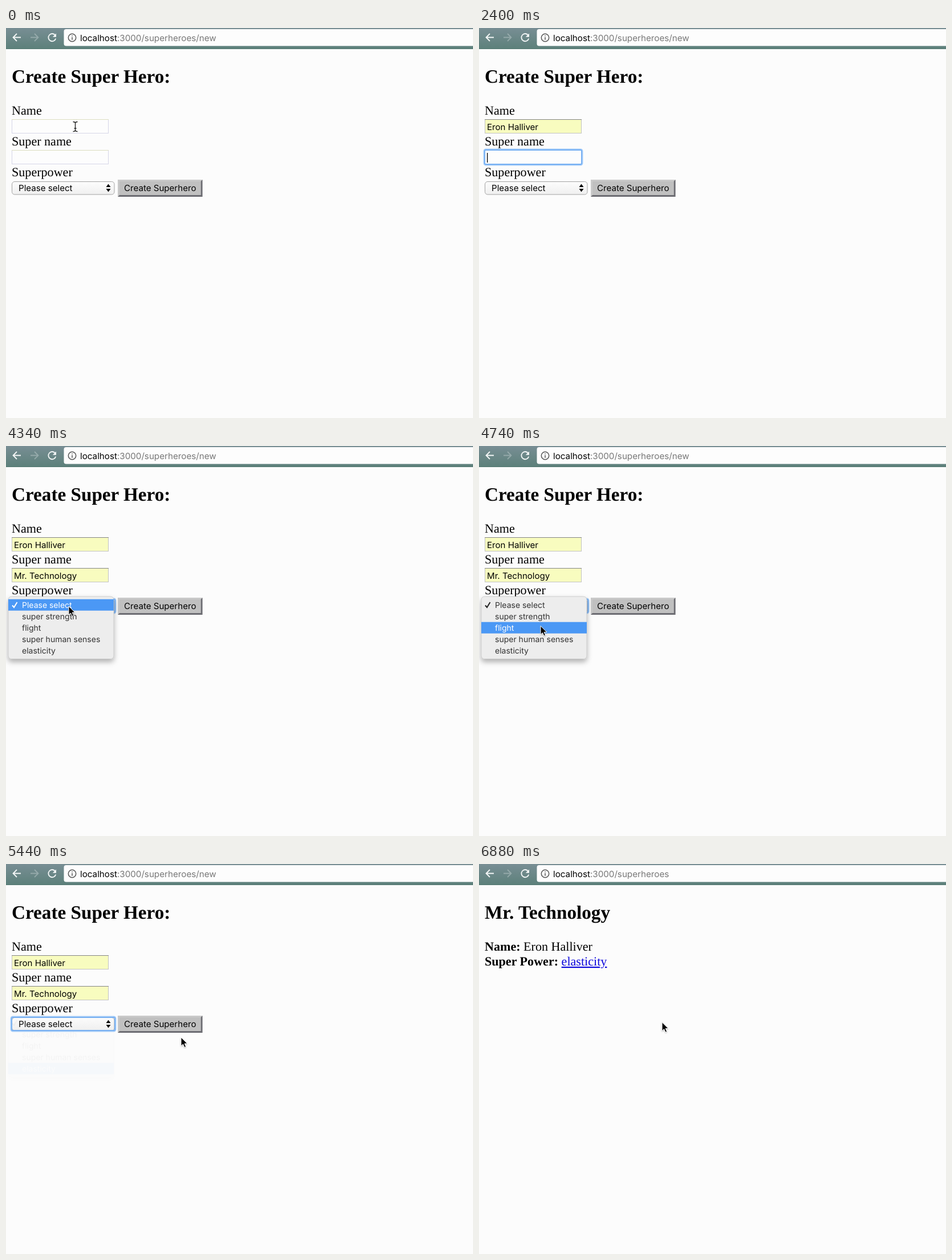
Write an HTML page that moves like this. It is 819 by 684 pixels and loops after 6900 ms.

```html
<!DOCTYPE html>
<html lang="en">
<head>
<meta charset="utf-8">
<title>Create Super Hero</title>
<style>
  html, body { margin: 0; width: 100%; height: 100%; overflow: hidden; background: #fcfcfc; }
  svg { display: block; }
  text { white-space: pre; text-rendering: geometricPrecision; }
  .ui { font: 15.1px Inter, Roboto, sans-serif; }
  .url { font: 15.2px Inter, Roboto, sans-serif; }
  .item { font: 14px Inter, Roboto, sans-serif; fill: #333; }
  .hint { font: 700 14.3px Inter, Roboto, sans-serif; }
  .page { font: 22.1px "Liberation Serif", Times, serif; }
  .head { font: bold 33.2px "Liberation Serif", Times, serif; }
  .bold { font-weight: bold; }
</style>
</head>
<body>
<svg id="stage" width="819" height="684" viewBox="0 0 819 684">
  <defs>
    <linearGradient id="bar" x2="0" y2="1">
      <stop stop-color="#788e94"/><stop offset="1" stop-color="#5c807a"/>
    </linearGradient>
    <linearGradient id="face" x2="0" y2="1">
      <stop stop-color="#fcfcfc"/><stop offset="1" stop-color="#f0f0f0"/>
    </linearGradient>
    <filter id="shade" x="-20%" y="-20%" width="140%" height="150%">
      <feDropShadow dx="0" dy="5" stdDeviation="5" flood-opacity=".3"/>
    </filter>
    <filter id="soft" x="-20%" y="-20%" width="150%" height="150%">
      <feDropShadow dx="0" dy="1" stdDeviation="1" flood-opacity=".3"/>
    </filter>
  </defs>

  <rect width="819" height="684" fill="#fcfcfc"/>
  <rect width="819" height="37" fill="url(#bar)"/>
  <rect y="36" width="819" height="1" fill="#527770"/>
  <rect x="101.5" y="2" width="730" height="29.5" rx="4" fill="#fdfdfd"/>
  <g fill="none" stroke="#f4f7f7" stroke-width="1.8">
    <path d="M26 16.5H13M19 10L12.5 16.5L19 23"/>
    <path d="M43 16.5H56M50 10L56.5 16.5L50 23" opacity=".3"/>
    <path d="M86.3 12.7A6.6 6.6 0 1 0 87.3 18.5"/>
    <path d="M88 9.5V15.7H81.8Z" fill="#f4f7f7" stroke="none"/>
  </g>
  <g fill="none" stroke="#555" stroke-width="1.5">
    <circle cx="116" cy="17" r="6.7"/>
    <path d="M116 16V20.7M116 13V14.6"/>
  </g>
  <text class="url" x="130" y="22.5">localhost<tspan id="path" fill="#777"></tspan></text>

  <g id="form">
    <text class="head" x="10" y="96">Create Super Hero:</text>
    <g class="page">
      <text x="10" y="152">Name</text>
      <text x="10" y="206">Super name</text>
      <text x="10" y="260">Superpower</text>
    </g>
    <g id="fields"></g>
    <rect x="10.5" y="269.5" width="179.5" height="22.5" rx="4.5" fill="url(#face)" stroke="#a3a3a3"/>
    <path d="M175.5 279L179.5 273.5L183.5 279ZM175.5 282L179.5 287.5L183.5 282Z"/>
    <text id="choice" class="ui" x="22" y="286"></text>
    <g id="button">
      <rect x="196" y="266" width="148.5" height="30" fill="#c9c9c9"/>
      <path id="bevel" d="M196 296L199 293H341.5V269L344.5 266V296Z" fill="#6c6c72"/>
      <rect x="199" y="269" width="142.5" height="24" fill="#c0c0c0"/>
      <text class="ui" x="207" y="286">Create Superhero</text>
    </g>
    <g id="ring" fill="none">
      <rect x="9" rx="3" stroke="#a9cffa" stroke-width="3"/>
      <rect x="10" rx="2" stroke="#74aef2" stroke-width="1.8"/>
    </g>
    <rect id="caret" width="1.3" height="17"/>
    <g id="hint">
      <rect x="10.5" y=".5" width="169" height="28" fill="#fdfdfd" stroke="#a9c6e8"/>
      <rect id="picked" x="11" y="1" width="168" height="27" fill="#d9e7f7"/>
      <text id="hintText" class="hint" x="20" y="21"></text>
    </g>
    <g id="menu">
      <rect x="4" y="264" width="185" height="109.5" rx="5.5" fill="#ededed" stroke="#bcbcbc" stroke-width=".7" filter="url(#shade)"/>
      <rect id="row" x="4" width="185" height="20" fill="#4b98f5"/>
      <g id="items"></g>
      <path id="check" d="M11 279.5L14 283L19.5 274" fill="none" stroke-width="2"/>
    </g>
  </g>

  <g id="result">
    <text id="heroName" class="head" x="10" y="96"></text>
    <g class="page">
      <text x="10" y="152"><tspan class="bold">Name:</tspan> <tspan id="person"></tspan></text>
      <text x="10" y="178"><tspan class="bold">Super Power:</tspan> <tspan fill="#0d08dc" text-decoration="underline">elasticity</tspan></text>
    </g>
  </g>

  <path id="arrow" d="M0 0V15.2L3.5 12L6 17.6L8.6 16.5L6.2 11H11Z" stroke="#fff" stroke-width="1" filter="url(#soft)"/>
  <path id="beam" d="M-4 -8.5Q0 -8.5 0 -6Q0 -8.5 4 -8.5M0 -6V6M-4 8.5Q0 8.5 0 6Q0 8.5 4 8.5M-2 3H2" fill="none" stroke="#222" stroke-width="1.4"/>
</svg>

<script>
const LOOP = 6900;
const PERSON = "Eron Halliver", HERO = "Mr. Technology";
const OPTIONS = ["Please select", "super strength", "flight", "super human senses", "elasticity"];
const OPEN = 4280, PICK = 5200, CHOSEN = 5460, PRESS = 6320, LOADED = 6520;

// Each field: focus, typing start, ms per key, keys typed, suggestion chosen, accepted, left
const fields = [
  { y: 160, value: PERSON, focus: 160, type: 400, pace: 130, keys: 8, pick: 1600, done: 1820, leave: 2080 },
  { y: 214, value: HERO, focus: 2080, type: 2520, pace: 160, keys: 2, pick: 3000, done: 3220, leave: 4240 }
];

// Pointer stops: time, x, y
const stops = [
  [0, 121.5, 173], [3620, 121.5, 173], [4120, 110, 281], [4360, 110, 281],
  [4740, 108, 315.5], [4860, 110, 319], [5080, 122, 354], [5210, 122, 354],
  [5430, 307, 304], [5680, 307, 304], [6100, 321, 277.5], [LOOP, 321, 277.5]
];

const $ = id => document.getElementById(id);
const show = (el, on) => el.style.display = on ? "" : "none";
const set = (el, attrs) => { for (const k in attrs) el.setAttribute(k, attrs[k]); };
const clamp = (v, lo, hi) => Math.max(lo, Math.min(hi, v));

$("person").textContent = PERSON;
$("heroName").textContent = HERO;
$("fields").innerHTML = fields.map(({ y }) => `<g>
  <rect x="10.5" y="${y + .5}" width="169" height="24"/>
  <path d="M10 ${y + .5}H180"/>
  <text class="ui" x="14" y="${y + 18.5}"></text></g>`).join("");
$("items").innerHTML = OPTIONS.map((name, i) =>
  `<text class="item" x="28" y="${283.5 + i * 20}">${name}</text>`).join("");
fields.forEach((f, i) => [f.box, f.edge, f.label] = $("fields").children[i].children);

function pointerAt(t) {
  const i = stops.findIndex(s => s[0] > t);
  const [a, b] = [stops[i - 1], stops[i]];
  const p = (t - a[0]) / (b[0] - a[0]), e = p * p * (3 - 2 * p);
  return [a[1] + (b[1] - a[1]) * e, a[2] + (b[2] - a[2]) * e];
}

function placeRing(y, width, height) {
  [...$("ring").children].forEach((r, i) =>
    set(r, { y: y - 1 + i, width: width + 2 - 2 * i, height: height + 2 - 2 * i }));
}

function drawField(f, t) {
  const typed = clamp(Math.floor((t - f.type) / f.pace) + 1, 0, f.keys);
  const filled = t >= f.pick;
  f.label.textContent = filled ? f.value : f.value.slice(0, typed);
  set(f.box, { fill: filled ? "#f8fcbf" : "#fdfdfd", stroke: filled ? "#c3c3c3" : "#d6d6e8" });
  set(f.edge, { stroke: filled ? "#858585" : "#dcdec0" });
  if (t < f.focus || t >= f.leave) return;
  placeRing(f.y, 170, 25);
  set($("caret"), { x: 14 + f.label.getComputedTextLength(), y: f.y + 5 });
  show($("caret"), true);
  show($("hint"), typed > 0 && t < f.done);
  show($("picked"), filled);
  set($("hint"), { transform: `translate(0 ${f.y + 26})` });
  $("hintText").textContent = f.value;
}

function drawMenu(t, y) {
  const row = t >= PICK ? 4 : clamp(Math.floor((y - 268.5) / 20), 0, 4);
  show($("menu"), t >= OPEN && t < CHOSEN);
  set($("menu"), { opacity: clamp(1 - (t - PICK) / 250, 0, 1) });
  set($("row"), { y: 268.7 + row * 20 });
  [...$("items").children].forEach((el, i) => el.style.fill = i === row ? "#fff" : "#333");
  set($("check"), { stroke: row ? "#222" : "#fff" });
}

function draw(t) {
  const [x, y] = pointerAt(t);
  const loaded = t >= LOADED;
  show($("form"), !loaded);
  show($("result"), loaded);
  $("path").textContent = ":3000/superheroes" + (loaded ? "" : "/new");

  show($("caret"), false);
  show($("hint"), false);
  show($("ring"), t >= fields[0].focus && t < PRESS);
  if (t >= fields[1].leave) placeRing(269, 181, 23);
  fields.forEach(f => drawField(f, t));
  $("choice").textContent = OPTIONS[t < CHOSEN ? 0 : 4];
  drawMenu(t, y);
  set($("bevel"), { fill: t >= PRESS && t < PRESS + 100 ? "#d8d8d8" : "#6c6c72" });

  // The pointer hides while keys are used
  const seen = t < fields[0].type || t >= 3640;
  const overField = fields.some(f => y >= f.y && y <= f.y + 25);
  show($("beam"), seen && overField);
  show($("arrow"), seen && !overField);
  for (const id of ["beam", "arrow"]) set($(id), { transform: `translate(${x} ${y})` });
}

const start = performance.now();
function tick() {
  draw((performance.now() - start) % LOOP);
  requestAnimationFrame(tick);
}
tick();
</script>
</body>
</html>
```
